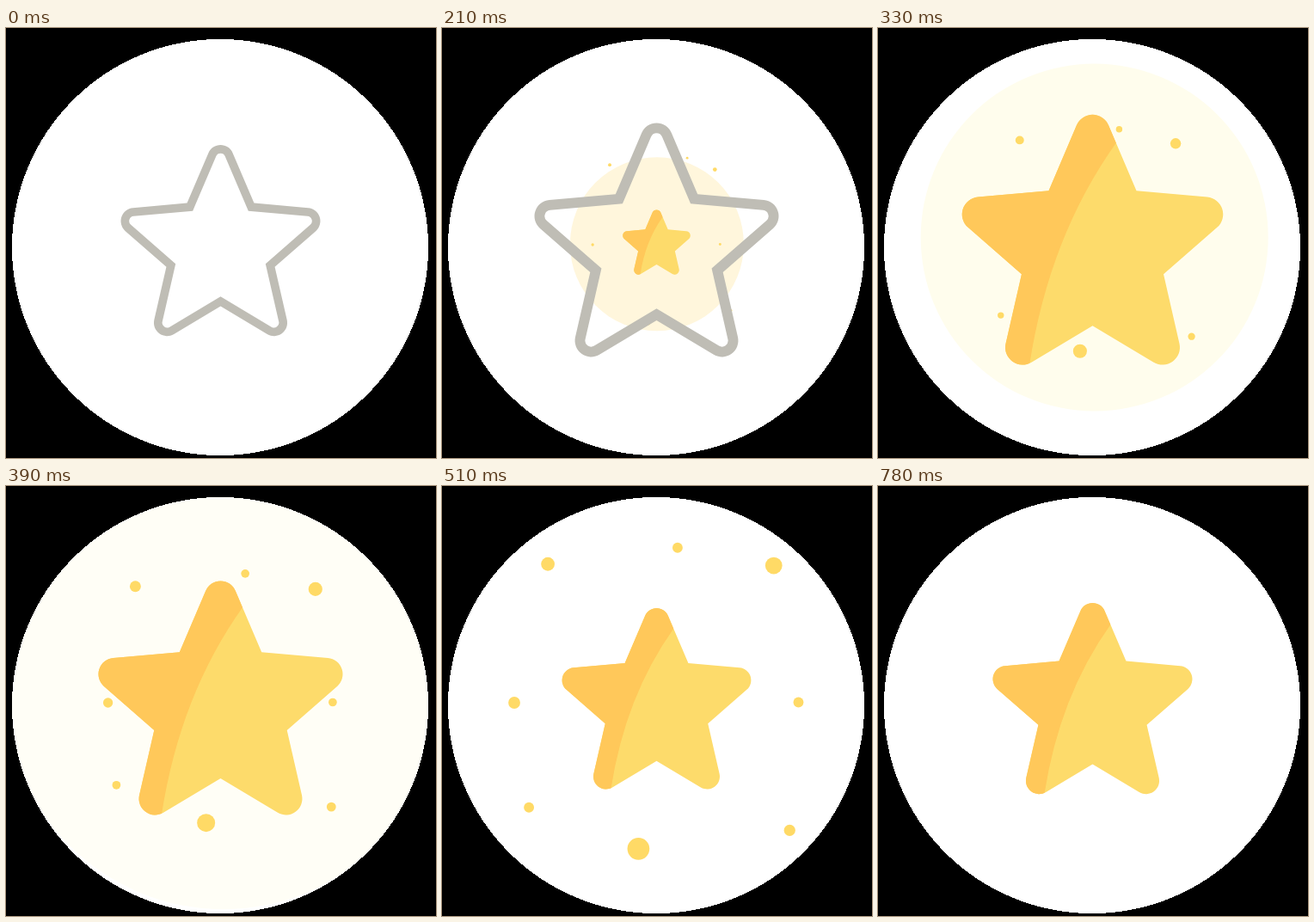
These frames come from a looping animation (500x500 px, 1.65 s). An HTML page with a canvas:

```html
<!DOCTYPE html>
<html lang="en">
<head>
<meta charset="utf-8">
<title>Star</title>
<style>
html, body { margin: 0; width: 100%; height: 100%; overflow: hidden; background: #000; }
canvas { display: block; }
</style>
</head>
<body>
<canvas width="500" height="500"></canvas>
<script>
const ctx = document.querySelector('canvas').getContext('2d');
const { PI, sin, cos, sqrt, min, max, floor, round } = Math;
const LOOP = 1650;

// The picture advances in 60 ms steps between 150 and 780 ms, with one longer hold.
function snap(t) {
  if (t < 150) return 0;
  if (t < 720) return min(630, 150 + 60 * floor((t - 150) / 60));
  return t < 780 ? 720 : 780;
}

// Smooth value at time t, moving from v0 at t0 to v1 at t1.
function ease(t, t0, v0, t1, v1) {
  const p = max(0, min(1, (t - t0) / (t1 - t0)));
  return v0 + (v1 - v0) * (1 - cos(PI * p)) / 2;
}

function starSize(t) {
  if (t < 300) return ease(t, 164, 0, 300, 1.32);
  if (t < 606) return ease(t, 300, 1.32, 606, .84);
  return ease(t, 606, .84, 780, 1);
}

function circle(x, y, r, color) {
  ctx.beginPath();
  ctx.arc(x, y, r, 0, 2 * PI);
  ctx.fillStyle = color;
  ctx.fill();
}

// Disc with a hard pixel edge, built from rows.
const disc = new Path2D();
for (let y = 13; y < 497; y++) {
  const half = sqrt(242 ** 2 - (y + .5 - 255) ** 2);
  const left = round(249 - half);
  disc.rect(left, y, round(249 + half) - left, 1);
}

const polar = (r, i) => {
  const a = (i / 5 - .5) * PI;
  return [r * cos(a), 7.2 + r * sin(a)];
};

const star = new Path2D();
star.moveTo(...polar(66.3, -1));
for (let i = 0; i < 10; i += 2) {
  star.arcTo(...polar(145, i), ...polar(66.3, i + 1), 15.4);
  star.lineTo(...polar(66.3, i + 1));
}
star.closePath();

const shade = new Path2D('M-150-150H60L21-89Q-38.5-5.5-56 108L-60 150H-150Z');

function inStar(scale, paint) {
  ctx.save();
  ctx.translate(249.5, 250);
  ctx.scale(scale, scale);
  ctx.clip(star);
  paint();
  ctx.restore();
}

function outline() {
  ctx.strokeStyle = '#bfbdb5';
  ctx.lineWidth = 19.4;
  ctx.stroke(star);
}

function solid() {
  ctx.fillStyle = '#fddb6b';
  ctx.fillRect(-150, -150, 300, 300);
  ctx.fillStyle = '#ffc85a';
  ctx.fill(shade);
}

function drawHalo(t) {
  const k = (t - 90) / 60;
  const tint = max(0, (450 - t) / 300);
  circle(248.1 + .9 * k, 258.9 - 3.85 * k, 50.5 * k,
    `rgb(255 ${255 - 14 * tint ** 2} ${255 - 44 * tint})`);
}

// Place and radius of each dot at 450 ms, clockwise from the right.
const dots = [
  [397.5, 251.5, 6], [391.5, 387, 6.7], [230.5, 407, 13], [114.5, 361, 6],
  [101, 252, 7], [136.5, 103.5, 8], [276, 86.5, 6], [373, 106, 10]
];

function drawDots(t) {
  const s = t - 450;
  const travel = .0086 * s - 2.6e-6 * s * s;
  const scale = max(0, min(1 + s / 315, 1 - (s / 270) ** 3));
  dots.forEach(([x, y, r], i) => {
    const a = i * PI / 4;
    const heading = a + .14 * sin(a) ** 5; // the upright ones lean left
    const d = travel * (34 + 2 * cos(2 * a) - 2.5 * cos(4 * a)); // diagonals are fastest
    circle(x + d * cos(heading), y + d * sin(heading), r * scale, '#ffda66');
  });
}

function draw(now) {
  const t = snap(now % LOOP);
  ctx.fillStyle = '#000';
  ctx.fillRect(0, 0, 500, 500);
  ctx.fillStyle = '#fff';
  ctx.fill(disc);
  ctx.save();
  ctx.clip(disc);
  if (t >= 150) {
    if (t < 450) drawHalo(t);
    if (t > 150) drawDots(t);
  }
  if (t < 300) inStar(ease(t, 83, 1, 284, 1.32), outline);
  if (t > 164) inStar(starSize(t), solid);
  ctx.restore();
  requestAnimationFrame(draw);
}
draw(0);
</script>
</body>
</html>
```
